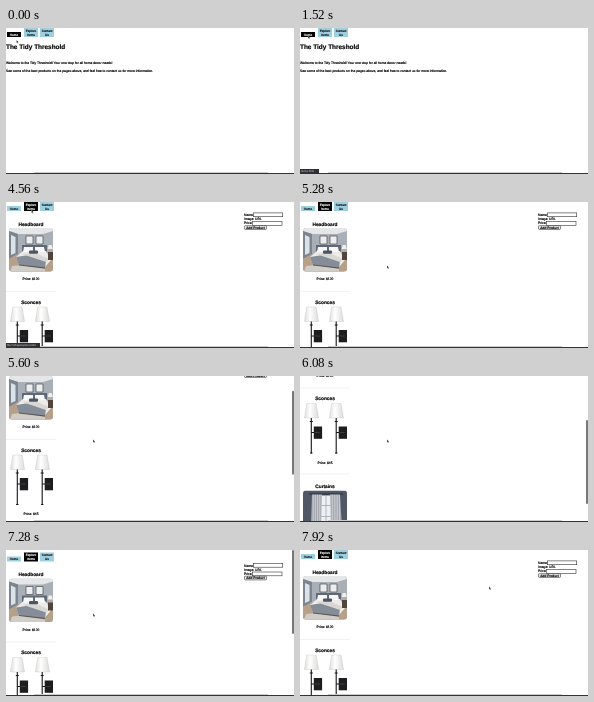
An HTML page that plays this animation: 288x146 px, repeating every 8000 ms.

```html
<!DOCTYPE html>
<html lang="en">
<head>
<meta charset="utf-8">
<title>Home decor shop</title>
<style>
html, body { margin: 0; width: 100%; height: 100%; overflow: hidden; background: #fff; }
svg { display: block; width: 288px; height: 146px; }
text { font-family: "Liberation Sans", Arial, sans-serif; font-size: 3.33px; text-rendering: geometricPrecision; stroke: #000; stroke-width: .16px; }
.mid { text-anchor: middle; }
.h1 { font-size: 6.45px; font-weight: bold; }
.h2 { font-size: 4.8px; font-weight: bold; }
.nav { font-size: 3.1px; text-anchor: middle; stroke: inherit; fill: inherit; }
.input { fill: #fff; stroke: #333; stroke-width: .6; }
</style>
</head>
<body>
<svg viewBox="0 0 288 146">
  <defs>
    <linearGradient id="shade">
      <stop offset="0" stop-color="#dededc"/><stop offset=".4" stop-color="#fff"/><stop offset="1" stop-color="#dcdbd9"/>
    </linearGradient>
    <linearGradient id="drape" x2=".2" spreadMethod="repeat">
      <stop offset="0" stop-color="#c9ccd0"/><stop offset=".5" stop-color="#a0a4ab"/><stop offset="1" stop-color="#c9ccd0"/>
    </linearGradient>
    <clipPath id="round"><rect width="44" height="43.5" rx="3"/></clipPath>
    <g id="sconce">
      <path d="M3 1H12.3L14.8 15.5H.6Z" fill="url(#shade)" stroke="#aaa" stroke-width=".25"/>
      <path d="M7.5 15.5V51M7.5 30H12" stroke="#151515" stroke-width="1.1" fill="none"/>
      <path d="M6 19h3M6.3 50.5h2.4" stroke="#151515" stroke-width="1.2"/>
      <rect x="10" y="24" width="8.3" height="12.3" fill="#1d1d1f"/>
      <path d="M11 30h5" stroke="#555" stroke-width=".6"/>
    </g>
  </defs>
  <rect width="288" height="146" fill="#fff"/>

  <g id="home">
    <text class="h1" x="0" y="20.8">The Tidy Threshold</text>
    <text x="0" y="36.3">Welcome to the Tidy Threshold! Your one stop for all home decor needs!</text>
    <text x="0" y="43.7">See some of the best products on the pages above, and feel free to contact us for more information.</text>
  </g>

  <g id="shop">
    <text class="h2 mid" x="25" y="23.6">Headboard</text>
    <g transform="translate(3 26)" clip-path="url(#round)">
      <rect width="44" height="44" fill="#a9afb7"/>
      <path d="M0 0H44V3L34 6H9L0 3Z" fill="#e4e6e8"/>
      <path d="M0 3L9 6V26L0 31Z" fill="#7c848f"/>
      <path d="M2 7L6.5 9V25L2 27Z" fill="#dbe2e8"/>
      <path d="M0 31L9 26H44V44H0Z" fill="#b7a08a"/>
      <path d="M17 8h7v8h-7zM27 8h7v8h-7z" fill="#eceeee" stroke="#454b53" stroke-width=".7"/>
      <path d="M13 17H38V29H13Z" fill="#5f6874"/>
      <path d="M14 23H37L42 32L36 39L10 36L7 29Z" fill="#ecebe9"/>
      <path d="M7 29L20 27L37 33L36 40L10 37Z" fill="#858d98"/>
      <path d="M13 26L26 25L40 31L37 34Z" fill="#d9d7d4"/>
      <path d="M15 19h9v5h-10zM26 19h9l1 5h-10z" fill="#f8f8f7"/>
      <rect x="20" y="22.5" width="9" height="3.3" rx="1" fill="#4c5562"/>
      <rect x="39" y="24" width="5" height="8" fill="#51443b"/>
      <path d="M39.7 17h3l1 4h-5z" fill="#f4efe3"/>
      <path d="M3 38L12 37L36 41V44H1Z" fill="#d0ccc7"/>
      <path d="M10 37L36 40" stroke="#4e4a48" stroke-width=".9"/>
    </g>
    <text class="mid" x="25" y="78.2">Price: $120</text>
    <path d="M0 89.5H50" stroke="#ececec" stroke-width=".7"/>

    <text class="h2 mid" x="25" y="101.9">Sconces</text>
    <use href="#sconce" x="3.8" y="104"/>
    <use href="#sconce" x="28.7" y="104"/>
    <text class="mid" x="25" y="165.3">Price: $45</text>
    <path d="M0 175.5H50" stroke="#ececec" stroke-width=".7"/>

    <text class="h2 mid" x="25" y="189">Curtains</text>
    <g transform="translate(3 192)" clip-path="url(#round)">
      <rect width="44" height="44" fill="#505866"/>
      <rect y="36" width="44" height="8" fill="#6e6864"/>
      <rect x="17" y="5" width="12" height="32" fill="#edf1f4"/>
      <path d="M23 5V37M17 15H29M17 26H29" stroke="#8b929a" stroke-width=".6"/>
      <path d="M6 3.5H40" stroke="#25282e" stroke-width=".9"/>
      <path d="M9 4H19L18 39H8Z" fill="url(#drape)"/>
      <path d="M27 4H37L39 39H28Z" fill="url(#drape)"/>
      <path d="M0 32H7V41H0Z" fill="#3b414b"/>
    </g>
    <text class="mid" x="25" y="244.2">Price: $30</text>

    <text x="238" y="14">Name:</text>
    <rect class="input" x="247.5" y="10.9" width="29.2" height="3.8"/>
    <text x="238" y="18.1">Image: URL</text>
    <text x="238" y="22.3">Price:</text>
    <rect class="input" x="246.5" y="19.5" width="29.5" height="3.8"/>
    <rect x="238.5" y="23.7" width="22" height="3.7" rx=".7" fill="#efefef" stroke="#333" stroke-width=".6"/>
    <text class="mid" x="249.5" y="26.7">Add Product</text>
  </g>

  <g id="nav"></g>
  <rect id="thumb" x="286" width="2" height="84" rx="1" fill="#777"/>
  <path d="M28 144.5H262" stroke="#ccc"/>
  <path d="M0 145.5H288" stroke="#333"/>
  <g id="status">
    <rect id="bar" y="141" height="4.6" fill="#2f3033"/>
    <text id="link" x="1" y="144.3" fill="#ddd" style="font-size:2.8px;stroke:none"></text>
  </g>
  <path id="cursor" d="M0 0V3L.7 2.4L1.2 3.5L1.7 3.2L1.2 2.2H2.2Z" fill="#111" stroke="#fff" stroke-width=".25"/>
</svg>
<script>
const $ = id => document.getElementById(id);
const LOOP = 8000, STEP = 80, MAX = 109, SWAP = 3920;

// [time, value, ...]
const cursorPath = [
  [0, 10.5, 12], [240, 10.5, 12], [320, 10.2, 12], [880, 10.2, 12], [1120, 8, 7.5], [1520, 8, 7.5],
  [2000, 8, 7.5], [2400, 36, 6], [2800, 26, 10], [3120, 25.5, 8], [3360, 25.5, 8],
  [4560, 25.5, 8], [5120, 87, 63.5], [7440, 87, 63.5], [7920, 189, 36.5]
];
const scrollPath = [
  [5280, 0], [5440, 8], [5600, 26], [5920, 62], [6240, 93], [6560, MAX],
  [6800, MAX], [6960, 82], [7120, 30], [7200, 5], [7280, -2.5], [7440, 0]
];
const thumbFade = [[5280, 0], [5360, 1], [7600, 1], [7840, 0]];
const statusFade = [[960, 0], [1200, 1], [4720, 1], [5040, 0]];
const statusWidth = [[3440, 19], [3600, 34]];

const buttons = [
  { x: 1, y: 4, w: 14, h: 5, lines: ["Home"] },
  { x: 18, y: 0, w: 14, h: 9, lines: ["Explore", "Items"] },
  { x: 34, y: 0, w: 14, h: 9, lines: ["Contact", "Us"] }
];

function at(table, t) {
  if (t <= table[0][0]) return table[0].slice(1);
  for (let i = 1; i < table.length; i++) {
    const [a, ...from] = table[i - 1], [b, ...to] = table[i];
    if (t <= b) return from.map((v, k) => v + (to[k] - v) * (t - a) / (b - a));
  }
  return table[table.length - 1].slice(1);
}

$("nav").innerHTML = buttons.map(({ x, y, w, h, lines }) => {
  const words = lines.map((s, i) =>
    `<text class="nav" x="${x + w / 2}" y="${7.6 - 3.7 * (lines.length - 1 - i)}">${s}</text>`).join("");
  return `<g><rect x="${x}" y="${y}" width="${w}" height="${h}" stroke="none"/>${words}</g>`;
}).join("");
const tabs = [...$("nav").children];

function draw(t) {
  const shop = t >= SWAP;
  const [scroll] = at(scrollPath, t), [x, y] = at(cursorPath, t);
  const shift = `translate(0 ${-scroll})`;
  $("home").style.display = shop ? "none" : "";
  $("shop").style.display = shop ? "" : "none";
  $("shop").setAttribute("transform", shift);
  $("nav").setAttribute("transform", shift);
  tabs.forEach((tab, i) => {
    const active = i === (shop ? 1 : 0), ink = active ? "#fff" : "#111";
    tab.setAttribute("fill", ink);
    tab.setAttribute("stroke", ink);
    tab.firstChild.setAttribute("fill", active ? "#000" : "#9dcfdf");
  });
  $("thumb").setAttribute("y", Math.max(0, scroll) / MAX * 62);
  $("thumb").style.opacity = at(thumbFade, t)[0];

  const [width] = at(statusWidth, t);
  $("bar").setAttribute("width", width);
  $("status").style.opacity = at(statusFade, t)[0];
  $("link").textContent = width > 30 ? "file:///shop/explore.html" : t < 2400 ? "home.html" : "explore.html";
  $("cursor").setAttribute("transform", `translate(${x} ${y})`);
}

const start = performance.now();
function tick() {
  const t = (performance.now() - start) % LOOP;
  draw(Math.floor(t / STEP) * STEP);
  requestAnimationFrame(tick);
}
tick();
</script>
</body>
</html>
```
